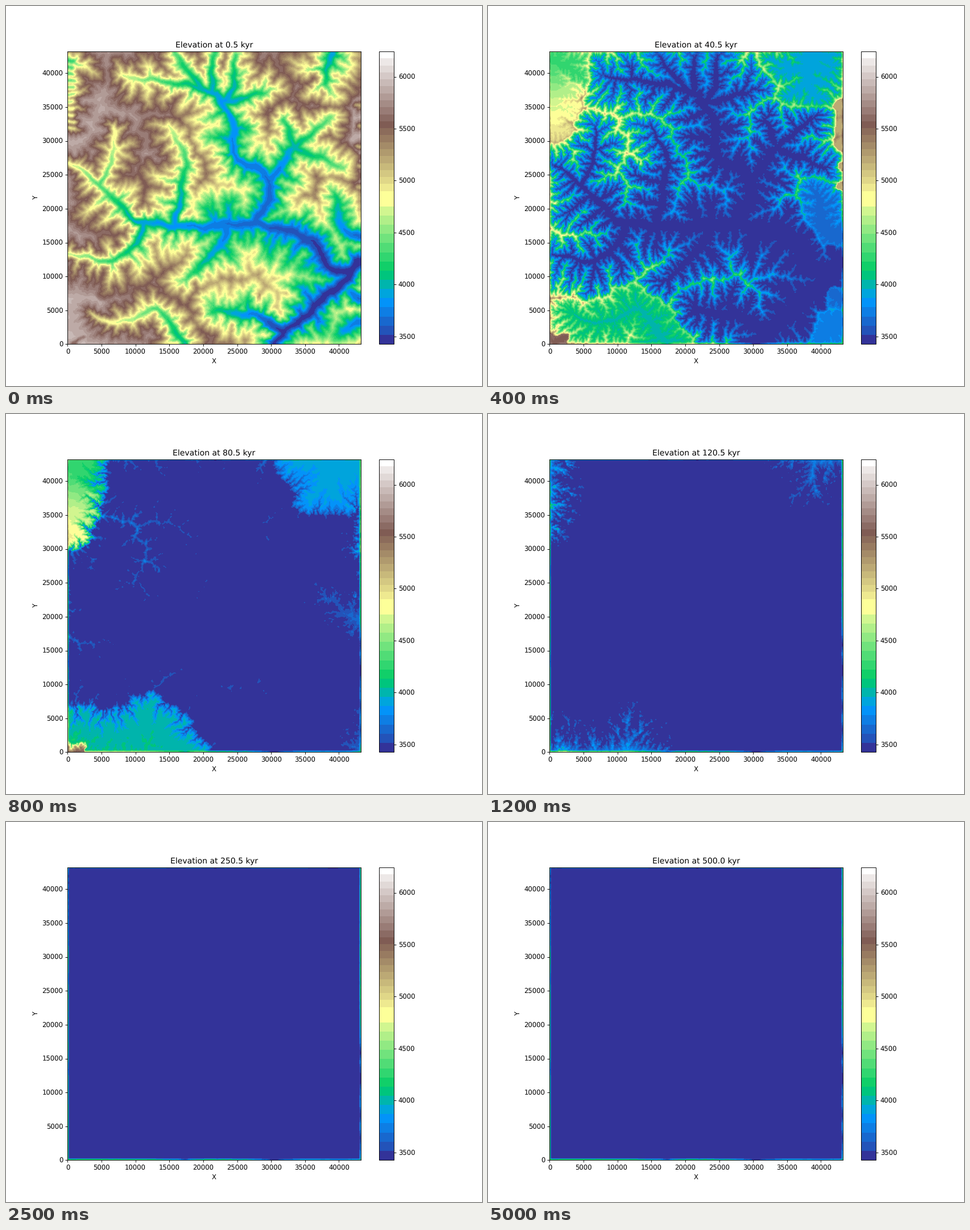
Write a matplotlib script that moves like this. It is 837 px wide and 669 px high and loops after 5.1 s.

```python
import numpy as np
import matplotlib.pyplot as plt
from matplotlib.animation import FuncAnimation
from matplotlib.colors import ListedColormap

N = 258                    # grid nodes per side
SIZE = 43.2                # km
VMIN, VMAX = 3426, 6242    # m
CREST, RELIEF = 5950, 2200
VALLEY_SLOPE = 60          # m per km along tributaries
FRAMES, STEP = 51, 10.0    # kyr between frames
ERODE, SUBSTEPS = 0.118, 4
FREE, EARLY, LATE = 0, 1, 2
RELEASE = {4: EARLY, 7: LATE}   # frame at which closed basins breach

# Key points in km, from mouth to head; main stems carry their two levels.
MAIN = [
    (3430, 3475, [(43.2, 12.2), (40, 8.5), (35.5, 4.6), (30.4, 0)]),
    (3440, 3880, [(41.5, 10.8), (38.6, 11.2), (35.9, 15.2), (27.8, 17.7),
                  (19.4, 17.2), (11.9, 17.8)]),
    (3620, 3880, [(27.8, 17.7), (29.9, 22.5), (29, 25.2), (24.9, 27.3),
                  (24.3, 32.8), (21.8, 36.9)]),
]
SIDE = [
    [(11.9, 17.8), (8.9, 19), (4.7, 23.5), (0, 26.9)],
    [(21.8, 36.9), (17.7, 38.2), (8.1, 39.5)],
    [(15.9, 18), (16.7, 22.3), (17.3, 28), (14.8, 32.3)],
    [(4.9, 23.4), (6.9, 29), (6.6, 32)],
    [(11.4, 17.7), (9, 13.7), (6, 12.2), (0, 13.4)],
    [(23.6, 17.2), (22.3, 14.3), (17.7, 9.7)],
    [(19.8, 37.7), (15.6, 43.1)],
    [(21.2, 37.2), (21.5, 43)],
    [(23.2, 35.5), (24.6, 39), (24.6, 43)],
    [(23, 35.6), (28.5, 37)],
    [(29.8, 24), (33.6, 29), (39, 33.5)],
    [(33.6, 29), (31.8, 33)],
    [(33.6, 29), (40.5, 26)],
    [(32, 1.8), (27.8, 4), (21.5, 4.8)],
]
CLOSED = [
    (EARLY, 3640, [(43.2, 15.6), (40.8, 16.8), (39.5, 21.8)]),
    (EARLY, 3670, [(43.2, 6.4), (41.8, 7.6)]),
    (EARLY, 3690, [(43.2, 3.2), (41, 2)]),
    (LATE, 4030, [(17.3, 0), (13.1, 5), (7.7, 3), (3.5, 4.2)]),
    (LATE, 3880, [(39, 43.2), (38, 38.5)]),
    (LATE, 5550, [(0.5, 0), (2.5, 0.9)]),
]
CLOSED += [(LATE, 4250 + 70 * k, [(0, 42 - k), (0.8, 42 - k)]) for k in range(11)]
CLOSED += [(EARLY, 5200, [(43.2, y), (42.8, y)]) for y in range(23, 36, 3)]

NEAR = [(dy, dx) for dy in (-1, 0, 1) for dx in (-1, 0, 1) if dy or dx]
LEN = np.array([np.hypot(dy, dx) for dy, dx in NEAR])
OFF = np.array([dy * N + dx for dy, dx in NEAR])
CELLS = np.arange(N * N).reshape(N, N)

rng = np.random.default_rng(7)
row, col = np.mgrid[0:N, 0:N].astype(float)
border = (row == 0) | (col == 0) | (row == N - 1) | (col == N - 1)


def neighbours(a):
    p = np.pad(a, 1, constant_values=np.inf)
    return [p[1 + dy:N + 1 + dy, 1 + dx:N + 1 + dx] for dy, dx in NEAR]


def spread(dist, cost):
    """Cheapest way from every cell to a seed: distance and next cell."""
    steps = [cost * n for n in LEN]
    while True:
        new = dist.copy()
        for near, step in zip(neighbours(dist), steps):
            np.minimum(new, near + step, out=new)
        if np.array_equal(new, dist):
            break
        dist = new
    pick = np.argmin([n + s for n, s in zip(neighbours(dist), steps)], axis=0)
    return dist, CELLS + OFF[pick]


def drained(order, recv):
    area = [1.0] * (N * N)
    for i in reversed(order):
        if recv[i] != i:
            area[recv[i]] += area[i]
    return np.array(area)


def lengths(recv):
    gap = np.abs(recv - CELLS.ravel())
    return np.where((gap == 1) | (gap == N), 1.0, np.sqrt(2))


def fractal(power):
    f = np.fft.fftfreq(N)
    k = np.hypot(f[:, None], f)
    k[0, 0] = 1
    a = np.fft.ifft2(np.fft.fft2(rng.normal(size=(N, N))) * k ** -power).real
    return (a - a.mean()) / a.std()


def to_cell(point):
    c, r = np.rint(np.array(point) / SIZE * (N - 1)).astype(int)
    return r, c


def curve(points, parts=3):
    """Catmull-Rom curve through the key points, in grid cells."""
    p = np.array(points, float) / SIZE * (N - 1)
    p = np.vstack([2 * p[0] - p[1], p, 2 * p[-1] - p[-2]])
    out = [p[1]]
    for a, b, c, d in zip(p, p[1:], p[2:], p[3:]):
        for t in np.arange(1, parts + 1) / parts:
            out.append(b + (c - a) * t / 2 + (a - 2.5 * b + 2 * c - d / 2) * t ** 2
                       + (1.5 * (b - c) + (d - a) / 2) * t ** 3)
    return np.array(out)


def lay_rivers():
    """Distance to the nearest river, its level, and distance in valley widths."""
    x = col + 1.1 * np.sin(row / 5.3) + 0.6 * np.sin(row / 2.1 + col / 9)
    y = row + 1.1 * np.sin(col / 4.7 + 1) + 0.6 * np.sin(col / 2.3 + row / 8)
    gap = np.full((N, N), np.inf)
    level, valley = np.zeros((N, N)), gap.copy()
    rivers = (MAIN + [(None, None, pts) for pts in SIDE]
              + [(z0, None, pts) for _, z0, pts in CLOSED])
    for z0, z1, pts in rivers:
        p = curve(pts)
        run = np.hypot(*np.diff(p, axis=0).T)
        total = run.sum()
        if z0 is None:
            z0 = level[to_cell(pts[0])]
        if z1 is None:
            z1 = z0 + VALLEY_SLOPE * total * SIZE / N
        ends = z0 + (z1 - z0) * (np.r_[0, np.cumsum(run)] / total) ** 1.3
        for a, b, za, zb, n in zip(p, p[1:], ends, ends[1:], run):
            ux, uy = (b - a) / n
            t = np.clip((x - a[0]) * ux + (y - a[1]) * uy, 0, n)
            d = np.hypot(x - a[0] - t * ux, y - a[1] - t * uy)
            level = np.where(d < gap, za + (zb - za) * t / n, level)
            gap = np.minimum(gap, d)
            width = np.interp(za, (3430, 3850, 4300), (5, 3.6, 2))
            valley = np.minimum(valley, d / width)
    return gap, level, valley


def build_terrain():
    gap, level, valley = lay_rivers()
    cost = rng.uniform(0.4, 1.8, (N, N))
    cost[gap < 0.8] = 0.02
    cost[border] = 50
    dist = np.full((N, N), np.inf)
    group = np.zeros(N * N, int)
    roots = np.zeros(N * N, bool)
    for kind, z0, pts in [(FREE, MAIN[0][0], MAIN[0][2])] + CLOSED:
        r, c = to_cell(pts[0])
        dist[r, c], level[r, c] = 0, z0
        roots[r * N + c], group[r * N + c] = True, kind
    dist, recv = spread(dist, cost)
    recv = np.where(roots, CELLS.ravel(), recv.ravel())
    order = np.argsort(dist.ravel()).tolist()

    river = (gap < 0.8).ravel() | roots
    level = level.ravel()
    for i in reversed(order):
        r = recv[i]
        if river[i] and not river[r]:
            river[r], level[r] = True, level[i]
    for i in order:
        if river[i] and not roots[i]:
            level[i] = max(level[i], level[recv[i]] + 0.01)

    km_x, km_y = col / N * SIZE, row / N * SIZE
    rough = np.exp(0.25 * fractal(1.2)) * (1 + 0.3 * np.exp(-km_x / 5))
    rough *= 1 - 0.3 * np.exp(-((km_x - 39.5) ** 2 + (km_y - 3) ** 2) / 22)
    rough = (rough * (0.1 + 0.9 * np.clip(valley, 0, 1) ** 2)).ravel()
    closed = border & ~roots.reshape(N, N)
    for _ in range(10):
        area = drained(order, recv.tolist())
        rise = (rough * (area + 6) ** -0.45 * lengths(recv)).tolist()
        relief, base = [0.0] * (N * N), level.tolist()
        for i in order:
            if not river[i]:
                r = recv[i]
                relief[i], base[i] = relief[r] + rise[i], base[r]
        relief, base = np.array(relief), np.array(base)
        relief *= RELIEF / np.percentile(relief, 95)
        z = base + relief / np.hypot(1, relief / (CREST - base))
        grid = z.reshape(N, N)
        open_z = np.where(closed, np.inf, grid)
        slope = [(grid - n) / s for n, s in zip(neighbours(open_z), LEN)]
        steep = (CELLS + OFF[np.argmax(slope, axis=0)]).ravel()
        recv = np.where(river, recv, steep)
        order = np.argsort(z).tolist()

    for i in order:
        group[i] = group[recv[i]]
    soft = np.pad(grid, 1, mode="edge")
    soft = sum(soft[1 + dy:N + 1 + dy, 1 + dx:N + 1 + dx] for dy, dx in NEAR) / 8
    z = np.where(river, z, 0.5 * z + 0.5 * soft.ravel())
    return z, recv, order, group


def reroute(recv, order, group, kind):
    """Send a closed basin over its divide into the open drainage."""
    moved = group == kind
    basin = moved.reshape(N, N)
    seeds = (group.reshape(N, N) < kind) & ~border
    cost = np.where(border, 50, rng.uniform(0.3, 1.7, (N, N)))
    cost[~basin] = np.inf
    dist, path = spread(np.where(seeds, 0, np.inf), cost)
    recv = np.where(moved, path.ravel(), recv)
    tail = [i for i in np.argsort(dist.ravel()).tolist() if moved[i]]
    order = [i for i in order if not moved[i]] + tail
    return recv, order, np.where(moved, FREE, group)


def simulate():
    z, recv, order, group = build_terrain()
    fixed = border.ravel()
    states = [z.reshape(N, N)]
    for n in range(25):
        if n in RELEASE:
            recv, order, group = reroute(recv, order, group, RELEASE[n])
        if n == 0 or n in RELEASE:
            area = drained(order, recv.tolist())
            rate = ERODE * np.sqrt(area) * STEP / SUBSTEPS / lengths(recv)
            inner = [i for i in order if not fixed[i]]
            links = list(zip(inner, recv[inner].tolist(), rate[inner].tolist()))
        h = z.tolist()
        for _ in range(SUBSTEPS):
            for i, r, c in links:
                if h[r] < h[i]:
                    h[i] = (h[i] + c * h[r]) / (1 + c)
        z = np.array(h)
        states.append(z.reshape(N, N))
    return states


def shown(z):
    """Thin the fixed rim by mixing it with the cells inside it."""
    inside = np.pad(z[1:-1, 1:-1], 1, mode="edge")
    return np.where(border, 0.65 * inside + 0.35 * z, z)


def banded_terrain():
    """Terrain colours in flat bands, finer in the upper half."""
    edges = np.r_[np.linspace(0, 0.47, 16), np.linspace(0.523, 1, 21)]
    mids = (edges[1:] + edges[:-1]) / 2
    mids[0], mids[-1] = 0, 1
    band = np.searchsorted(edges, (np.arange(515) + 0.5) / 515) - 1
    return ListedColormap(plt.get_cmap("terrain")(mids[band]))


states = simulate()

DPI = 83.7
plt.rcParams["text.hinting"] = "none"
fig, ax = plt.subplots(figsize=(837.02 / DPI, 669.02 / DPI), dpi=DPI)
image = ax.imshow(shown(states[0]), origin="lower", cmap=banded_terrain(),
                  vmin=VMIN, vmax=VMAX, extent=(0, SIZE * 1000, 0, SIZE * 1000),
                  interpolation="bilinear", interpolation_stage="data")
fig.colorbar(image, ax=ax)
ticks = range(0, 40001, 5000)
ax.set(xlabel="X", ylabel="Y", xticks=ticks, yticks=ticks)
title = ax.set_title("")


def draw(n):
    image.set_data(shown(states[min(n, len(states) - 1)]))
    title.set_text(f"Elevation at {min(0.5 + STEP * n, 500):.1f} kyr")
    return image, title


anim = FuncAnimation(fig, draw, frames=FRAMES, interval=100, repeat=True,
                     init_func=lambda: draw(0))
plt.show()
```
